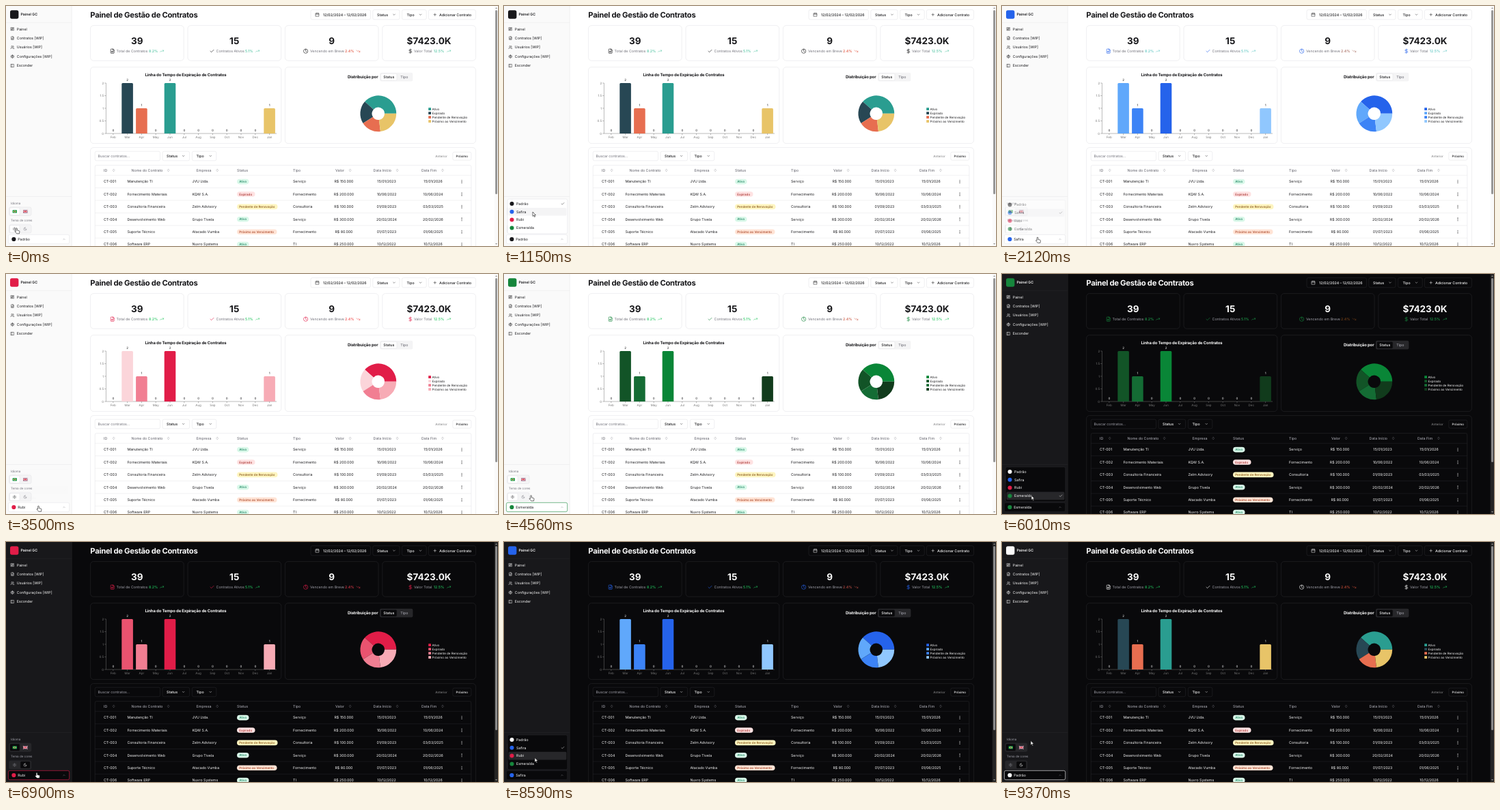
An HTML page for the animation above (9470 ms loop, 720x352 px).

```html
<!DOCTYPE html>
<html lang="pt-BR">
<head>
<meta charset="utf-8">
<title>Painel de Gestão de Contratos</title>
<style>
  html, body { margin: 0; width: 100%; height: 100%; overflow: hidden; }
  svg { display: block; width: 100vw; height: 100vh; background: var(--bg); }
  text { font-family: Inter, sans-serif; text-rendering: geometricPrecision; white-space: pre; }
</style>
</head>
<body>
<svg id="stage" viewBox="0 0 720 352"></svg>
<script>
const LOOP = 9470;
const DARK_AT = 4790;
// Each visit to the palette menu: time opened, time picked, theme picked
const VISITS = [
  [440, 1430, 1], [2060, 2950, 2], [3500, 4320, 3],
  [5690, 6490, 2], [7050, 7910, 1], [8400, 9350, 0],
];
// Pointer stops: time, x, y
const POINTER = [
  [20, 15.5, 326], [300, 40, 340], [440, 40, 340], [1150, 42, 302], [1450, 42, 302],
  [1950, 52, 339.5], [2400, 52, 339.5], [2620, 46, 312], [2960, 46, 312],
  [3260, 47.5, 340.5], [3520, 47.5, 340.5], [3970, 45, 325], [4510, 45, 325],
  [4650, 27, 325], [5060, 27, 325], [5490, 42, 339.5], [5700, 42, 339.5],
  [6300, 44, 312], [6500, 44, 312], [6850, 45, 338.5], [7060, 45, 338.5],
  [7770, 46, 301], [7920, 46, 301], [8250, 45, 339], [8450, 45, 339],
  [8590, 45, 316.5], [8810, 44, 303], [8910, 44, 303], [9180, 42, 291.5],
];

const NAMES = ['Padrão', 'Safira', 'Rubi', 'Esmeralda'];
const KEYS = ['primary', 'c0', 'c1', 'c2', 'c3', 'up', 'down'];
const LIGHT = [
  '#18181b #2a9d90 #274754 #e76e50 #e8c468 #4fc3a1 #e0523c',
  '#2563eb #2563eb #60a8fb #3c83f6 #90c7fe #5cc5c0 #a5685c',
  '#e11d48 #e11d48 #fbd5da #f17e92 #f7abb5 #22c55e #ef4444',
  '#16863c #098637 #125427 #146c34 #113b1c #22c55e #c9553f',
].map(s => s.split(' '));
const DARK = [
  '#fafafa #2a9d90 #274754 #e76e50 #e8c468 #22c55e #cf4f38',
  '#2563eb #2563eb #60a8fb #3c83f6 #90c7fe #22c55e #c05046',
  '#e11d48 #e11d48 #e9536f #f17e92 #f7abb5 #22c55e #e03a4a',
  '#16863c #098637 #125427 #146c34 #113b1c #1fa34e #7a4318',
].map(s => s.split(' '));
const SURFACE_KEYS = ['bg', 'side', 'fg', 'muted', 'border', 'soft', 'track', 'thumb', 'axis'];
const SURFACES = [
  '#ffffff #fafafa #18181b #71717a #e4e4e7 #f4f4f5 #fafafa #979797 #777777',
  '#09090b #18181b #fafafa #a1a1aa #27272a #27272a #242424 #8c8c8c #777777',
].map(s => s.split(' '));

const ICONS = {
  file: 'M15 2H6a2 2 0 0 0-2 2v16a2 2 0 0 0 2 2h12a2 2 0 0 0 2-2V7ZM14 2v6h6M8 13h8M8 17h8',
  check: 'M20 6 9 17l-5-5',
  clock: 'M12 2a10 10 0 1 0 10 10A10 10 0 0 0 12 2v10l5 3',
  dollar: 'M12 2v20M17 5H9.5a3.5 3.5 0 0 0 0 7h5a3.5 3.5 0 0 1 0 7H6',
  rise: 'M22 7l-8.5 8.5-5-5L2 17M16 7h6v6',
  fall: 'M22 17l-8.5-8.5-5 5L2 7M16 17h6v-6',
  calendar: 'M3 4h18v18H3ZM3 10h18M8 2v4M16 2v4',
  down: 'M6 9l6 6 6-6',
  up: 'M18 15l-6-6-6 6',
  sort: 'M7 15l5 5 5-5M7 9l5-5 5 5',
  plus: 'M5 12h14M12 5v14',
  grid: 'M3 3h7v9H3ZM14 3h7v5h-7ZM14 12h7v9h-7ZM3 16h7v5H3Z',
  users: 'M16 21v-2a4 4 0 0 0-4-4H6a4 4 0 0 0-4 4v2M9 3a4 4 0 1 0 .01 0M22 21v-2a4 4 0 0 0-3-4M16 3a4 4 0 0 1 0 8',
  gear: 'M12 9a3 3 0 1 0 .01 0M12 4a8 8 0 1 0 .01 0M12 1v3M12 20v3M1 12h3M20 12h3M4 4l2 2M18 18l2 2M4 20l2-2M18 6l2-2',
  panel: 'M3 3h18v18H3ZM9 3v18',
  sun: 'M12 8a4 4 0 1 0 .01 0M12 2v2M12 20v2M2 12h2M20 12h2M5 5l1.4 1.4M17.6 17.6 19 19M5 19l1.4-1.4M17.6 6.4 19 5',
  moon: 'M12 3a6 6 0 0 0 9 9 9 9 0 1 1-9-9Z',
};

const paint = c => !c || c[0] === '#' ? c || 'none' : `var(--${c})`;
const box = (x, y, w, h, r = 0, fill, stroke, extra = '') =>
  `<rect x="${x}" y="${y}" width="${w}" height="${h}" rx="${r}" fill="${paint(fill)}" stroke="${paint(stroke)}" stroke-width=".6" ${extra}/>`;
const line = (x1, y1, x2, y2, color = 'border', w = .5) =>
  `<path d="M${x1} ${y1}L${x2} ${y2}" stroke="${paint(color)}" stroke-width="${w}"/>`;
const circle = (x, y, r, fill, extra = '') =>
  `<circle cx="${x}" cy="${y}" r="${r}" fill="${paint(fill)}" ${extra}/>`;
// y is the optical middle of the line
const text = (x, y, s, { size = 5.25, weight = 400, fill = 'fg', anchor = 'start', extra = '' } = {}) =>
  `<text x="${x}" y="${(y + size * .36).toFixed(2)}" font-size="${size}" font-weight="${weight}" fill="${paint(fill)}" text-anchor="${anchor}" ${extra}>${s}</text>`;
const icon = (x, y, name, size = 6, color = 'fg') =>
  `<path transform="translate(${x - size / 2} ${y - size / 2}) scale(${size / 24})" d="${ICONS[name]}" fill="none" stroke="${paint(color)}" stroke-width="2" stroke-linecap="round" stroke-linejoin="round"/>`;
const button = (x, y, w, h, label, tx, chevron) =>
  box(x, y, w, h, 2.25, 'bg', 'border') + text(tx, y + h / 2, label, { weight: 500 }) +
  (chevron ? icon(chevron, y + h / 2, 'down', 5.5) : '');
const tight = 'letter-spacing="-.025em"';

function sidebar() {
  const menu = [['grid', 'Painel'], ['file', 'Contratos [WIP]'], ['users', 'Usuários [WIP]'],
    ['gear', 'Configurações [WIP]'], ['panel', 'Esconder']];
  const label = { size: 4.5, fill: 'muted' };
  return box(0, 0, 96.4, 352, 0, 'side') + line(96.2, 0, 96.2, 352) +
    box(6, 6.3, 12.4, 12.4, 2.6, 'primary') +
    text(21.5, 12.6, 'Painel GC', { weight: 600 }) +
    line(0, 24.3, 96, 24.3) + line(0, 279.5, 96, 279.5) +
    menu.map(([glyph, s], i) =>
      icon(9.4, 33.7 + i * 13.45, glyph, 5.6) + text(15.8, 33.7 + i * 13.45, s)).join('') +
    text(7, 289, 'Idioma', label) +
    box(4.5, 295, 32.5, 12.5, 2.25, 'soft', 'border') + box(5.6, 296, 14.5, 10.5, 1.6, 'bg', 'border') +
    box(9.6, 299.2, 6.4, 4.4, .5, '#159a55') +
    '<path d="M10.2 301.4l2.6-1.7 2.6 1.7-2.6 1.7Z" fill="#f3d335"/>' + circle(12.8, 301.4, .9, '#24479b') +
    box(25, 299.2, 6.4, 4.4, .5, '#2d3c78') +
    '<path d="M25 299.2l6.4 4.4m0-4.4l-6.4 4.4M28.2 299.2v4.4M25 301.4h6.4" stroke="#fff" stroke-width="1.1"/>' +
    '<path d="M25 299.2l6.4 4.4m0-4.4l-6.4 4.4M28.2 299.2v4.4M25 301.4h6.4" stroke="#d52b3d" stroke-width=".65"/>' +
    text(7, 314.3, 'Tema de cores', label) +
    box(4.5, 320.8, 32.5, 12.2, 2.25, 'soft', 'border') +
    box(5.6, 321.7, 14.5, 10.4, 1.6, 'bg', 'border', 'id="modePill"') +
    icon(12.5, 327, 'sun', 5.5, 'sunInk') + icon(28, 327, 'moon', 5.5, 'moonInk') +
    box(3.4, 335.3, 89.3, 13.4, 2.25, 'bg', 'ring') +
    circle(11.4, 342, 3.1, 'primary') + text(17.2, 342, '', { extra: 'id="picked"' }) +
    icon(85, 342, 'up', 4.6, 'muted');
}

function header() {
  return text(123.3, 12.6, 'Painel de Gestão de Contratos', { size: 11.25, weight: 700, extra: tight }) +
    button(446, 5.6, 87.4, 14.2, '12/02/2024 – 12/02/2026', 464) + icon(455.6, 12.7, 'calendar') +
    button(536.8, 5.6, 39.2, 14.2, 'Status', 543, 568) +
    button(579.6, 5.6, 35.6, 14.2, 'Tipo', 586.5, 606.5) +
    button(618.4, 5.6, 69, 14.2, 'Adicionar Contrato', 634) + icon(627.7, 12.7, 'plus');
}

function stats() {
  const cards = [
    [123.6, '39', 'file', 155.7, 'Total de Contratos', 161.6, '8.2%', 209, 228],
    [266, '15', 'check', 301.5, 'Contratos Ativos', 307.6, '5.1%', 350, 368],
    [408.4, '9', 'clock', 438.6, 'Vencendo em Breve', 445, '2.4%', 496, 515.3],
    [550.8, '$7423.0K', 'dollar', 591.8, 'Valor Total', 597, '12.5%', 625.8, 648],
  ];
  return cards.map(([x, value, glyph, ix, label, lx, rate, rx, tx]) => {
    const trend = glyph === 'clock' ? 'down' : 'up';
    return box(x, 28.6, 136.6, 51.6, 4.5, 'bg', 'border') +
      text(x + 68.2, 51, value, { size: 13.5, weight: 700, anchor: 'middle' }) +
      icon(ix, 66.2, glyph, 7.5, 'primary') + text(lx, 66.2, label, { fill: 'muted' }) +
      text(rx, 66.2, rate, { weight: 500, fill: trend }) +
      icon(tx, 66.2, trend === 'up' ? 'rise' : 'fall', 6, trend);
  }).join('');
}

function barChart() {
  const months = 'Feb Mar Apr May Jun Jul Aug Sep Oct Nov Dec Jan'.split(' ');
  const bars = { Mar: [2, 'c1'], Apr: [1, 'c2'], Jun: [2, 'c0'], Jan: [1, 'c3'] };
  const left = 146.4, base = 187, unit = 37, step = 20.8;
  let out = box(123.6, 89.6, 279.2, 112, 4.5, 'bg', 'border') +
    text(263, 101.2, 'Linha do Tempo de Expiração de Contratos',
      { size: 6, weight: 700, anchor: 'middle', extra: tight }) +
    line(left, base - 2 * unit, left, base, 'axis') + line(left, base, left + 12 * step, base, 'axis');
  for (let v = 0; v <= 2; v += .5) {
    const y = base - v * unit;
    out += line(left - 2.2, y, left, y, 'axis') +
      text(left - 3.2, y, v, { size: 4.5, fill: 'axis', anchor: 'end' });
  }
  months.forEach((month, i) => {
    const x = left + (i + .5) * step;
    const [value, color] = bars[month] || [0];
    const top = base - value * unit;
    if (value) out += `<path d="M${x - 8.3} ${base}V${top + 1.5}q0-1.5 1.5-1.5h13.6q1.5 0 1.5 1.5V${base}Z" fill="${paint(color)}"/>`;
    out += line(x, base, x, base + 2.2, 'axis') +
      text(x, base + 5.2, month, { size: 4.5, fill: 'axis', anchor: 'middle' }) +
      text(x, top - 4.4, value, { size: 4.5, anchor: 'middle' });
  });
  return out;
}

function donut() {
  const slices = [[15, 'Ativo'], [8, 'Expirado'], [7, 'Pendente de Renovação'], [9, 'Próximo ao Vencimento']];
  const cx = 544.8, cy = 157.8;
  const at = (r, a) => `${(cx + r * Math.cos(a)).toFixed(2)} ${(cy - r * Math.sin(a)).toFixed(2)}`;
  let angle = 0;
  return box(408.4, 89.6, 279, 112, 4.5, 'bg', 'border') +
    text(500, 104.2, 'Distribuição por', { size: 6, weight: 700, extra: tight }) +
    box(547, 97.8, 48.4, 12.8, 2.25, 'soft') + box(548.6, 99.2, 23.4, 10, 1.6, 'bg', 'border') +
    text(560.3, 104.2, 'Status', { weight: 500, anchor: 'middle' }) +
    text(582.8, 104.2, 'Tipo', { weight: 500, fill: 'muted', anchor: 'middle' }) +
    slices.map(([count, label], i) => {
      const end = angle + count / 39 * 2 * Math.PI;
      const d = `M${at(26.4, angle)}A26.4 26.4 0 0 0 ${at(26.4, end)}L${at(9.2, end)}A9.2 9.2 0 0 1 ${at(9.2, angle)}Z`;
      angle = end;
      return `<path d="${d}" fill="var(--c${i})"/>` + box(618.2, 149.2 + i * 6, 3.8, 3.8, 0, 'c' + i) +
        text(623.6, 151.1 + i * 6, label, { size: 4.5 });
    }).join('');
}

function table() {
  const badges = {
    'Ativo': [17.5, '#d9f8e9', '#15805c'],
    'Expirado': [26.5, '#fee2e2', '#a8322f'],
    'Pendente de Renovação': [59.5, '#fef5c0', '#84510f'],
    'Próximo ao Vencimento': [58.5, '#ffe4d6', '#a63d1c'],
  };
  const heads = [[143, 'ID', 157.6], [183.5, 'Nome do Contrato', 237.6], [278.6, 'Empresa', 309.2],
    [338, 'Status'], [420, 'Tipo'], [482, 'Valor', 503.6], [537.6, 'Data Início', 572.6], [608, 'Data Fim', 639]];
  const rows = [
    'Manutenção TI|JVU Ltda.|Ativo|Serviço|150|15/01/2023|15/01/2026',
    'Fornecimento Materiais|KQW S.A.|Expirado|Fornecimento|200|10/06/2022|10/06/2024',
    'Consultoria Financeira|Zelm Advisory|Pendente de Renovação|Consultoria|100|01/09/2023|03/03/2025',
    'Desenvolvimento Web|Grupo Tivela|Ativo|Serviço|300|20/02/2024|20/02/2026',
    'Suporte Técnico|Atacado Vumba|Próximo ao Vencimento|Fornecimento|80|01/07/2023|01/06/2025',
    'Software ERP|Nuvro Systems|Ativo|TI|250|10/12/2022|10/12/2026',
  ];
  const mid = { anchor: 'middle' };
  return box(123.6, 207.6, 563.8, 170, 4.5, 'bg', 'border') +
    box(130.2, 213.2, 95.4, 13.6, 2.25, 'bg', 'border') +
    text(134.6, 220.2, 'Buscar contratos...', { fill: 'muted' }) +
    button(229, 213.2, 39.6, 13.6, 'Status', 235, 259.6) +
    button(272.4, 213.2, 35.4, 13.6, 'Tipo', 278.4, 299.2) +
    text(637, 220.2, 'Anterior', { size: 4.5, weight: 500, anchor: 'middle', extra: 'opacity=".5"' }) +
    box(653.8, 214.2, 27, 12, 2.25, 'bg', 'border') +
    text(667.3, 220.2, 'Próximo', { size: 4.5, weight: 500, anchor: 'middle' }) +
    box(130.2, 233.6, 550.6, 140, 2.25, '', 'border') +
    heads.map(([x, s, sort]) => text(x, 240.9, s, { weight: 500, fill: 'muted' }) +
      (sort ? icon(sort, 240.9, 'sort', 5.2, 'muted') : '')).join('') +
    rows.map((row, i) => {
      const [name, firm, status, type, amount, from, to] = row.split('|');
      const [w, bg, ink] = badges[status];
      const y = 257.6 + i * 18.4;
      return line(130.2, y - 9.3, 680.8, y - 9.3) +
        text(143, y, 'CT-00' + (i + 1)) + text(177.4, y, name) + text(272.5, y, firm) +
        box(338, y - 3.8, w, 7.6, 3.8, bg) + text(341.2, y, status, { size: 4.5, weight: 500, fill: ink }) +
        text(420, y, type) + text(494.4, y, `R$ ${amount}.000`, mid) +
        text(557, y, from, mid) + text(625, y, to, mid) +
        [-1.9, 0, 1.9].map(dy => circle(667, y + dy, .55, 'fg')).join('');
    }).join('');
}

const itemY = i => 290 + i * 11.8;
function menu() {
  return '<g id="menu">' + box(5.2, 283, 87.6, 50.8, 2.25, 'bg', 'border') +
    box(6.6, 0, 84.8, 11.6, 1.5, 'soft', '', 'id="hover"') +
    NAMES.map((name, i) => circle(11.5, itemY(i), 3, 'dot' + i) + text(18, itemY(i), name)).join('') +
    `<g id="tick">${icon(86, 0, 'check', 5.6)}</g></g>`;
}

const scrollbar = box(714.6, 0, 5.4, 352, 0, 'track') + box(716, 6, 3, 270, 1.5, 'thumb') +
  '<path d="M716 4l1.5-2 1.5 2ZM716 348l1.5 2 1.5-2Z" fill="var(--thumb)"/>';
const pointer = '<g id="pointer" fill="#fff" stroke="#111" stroke-width=".6" stroke-linejoin="round">' +
  '<path id="hand" d="M-.9 .6a.9 .9 0 0 1 1.8 0V3l2.6 .6q1 .3 .9 1.2L4 7.8H.2L-2.4 4.8q0-1.1 .9-.8l.6 .5Z"/>' +
  '<path id="arrow" d="M0 0V6.4L1.5 5 2.6 7.4 3.6 7 2.5 4.6H4.5Z"/></g>';

const stage = document.getElementById('stage');
stage.innerHTML = header() + stats() + barChart() + donut() + table() + sidebar() + scrollbar + menu() + pointer;
const el = id => document.getElementById(id);
const setVars = (keys, values) => keys.forEach((k, i) => stage.style.setProperty('--' + k, values[i]));

function pointerAt(t) {
  const next = POINTER.findIndex(p => p[0] > t);
  if (next === 0) return POINTER[0].slice(1);
  if (next < 0) return POINTER[POINTER.length - 1].slice(1);
  const [t0, x0, y0] = POINTER[next - 1], [t1, x1, y1] = POINTER[next];
  const u = (t - t0) / (t1 - t0), k = u * u * (3 - 2 * u);
  return [x0 + (x1 - x0) * k, y0 + (y1 - y0) * k];
}

function render(t) {
  const dark = t >= DARK_AT;
  const last = VISITS.filter(v => v[1] <= t).pop();
  const theme = last ? last[2] : 0;
  const visit = VISITS.find(v => t >= v[0] && t < v[1]);
  const palettes = dark ? DARK : LIGHT;
  const palette = palettes[theme];
  const focused = last && !visit && !(dark && last[1] < DARK_AT);

  setVars(SURFACE_KEYS, SURFACES[+dark]);
  setVars(KEYS, palette);
  setVars(['dot0', 'dot1', 'dot2', 'dot3'], palettes.map(p => p[0]));
  setVars(['ring', 'sunInk', 'moonInk'], [focused ? palette[0] : 'var(--border)',
    dark ? 'var(--muted)' : 'var(--fg)', dark ? 'var(--fg)' : 'var(--muted)']);
  el('picked').textContent = NAMES[theme];
  el('modePill').setAttribute('x', dark ? 21 : 5.6);

  const [x, y] = pointerAt(t);
  const overMenu = visit && y > 283 && y < 334;
  const shown = visit ? Math.min(1, (t - visit[0]) / 120) : 0;
  const active = overMenu ? Math.max(0, Math.min(3, Math.round((y - 290) / 11.8))) : theme;
  el('menu').setAttribute('opacity', shown);
  el('menu').setAttribute('transform', `translate(0 ${3 * (1 - shown)})`);
  el('hover').setAttribute('y', itemY(active) - 5.8);
  el('tick').setAttribute('transform', `translate(0 ${itemY(theme)})`);
  const arrow = overMenu || (y > 283 && y < 320);
  el('pointer').setAttribute('transform', `translate(${x} ${y})`);
  el('hand').setAttribute('visibility', arrow ? 'hidden' : 'visible');
  el('arrow').setAttribute('visibility', arrow ? 'visible' : 'hidden');
}

const start = performance.now();
function tick() {
  render((performance.now() - start) % LOOP);
  requestAnimationFrame(tick);
}
tick();
</script>
</body>
</html>
```
